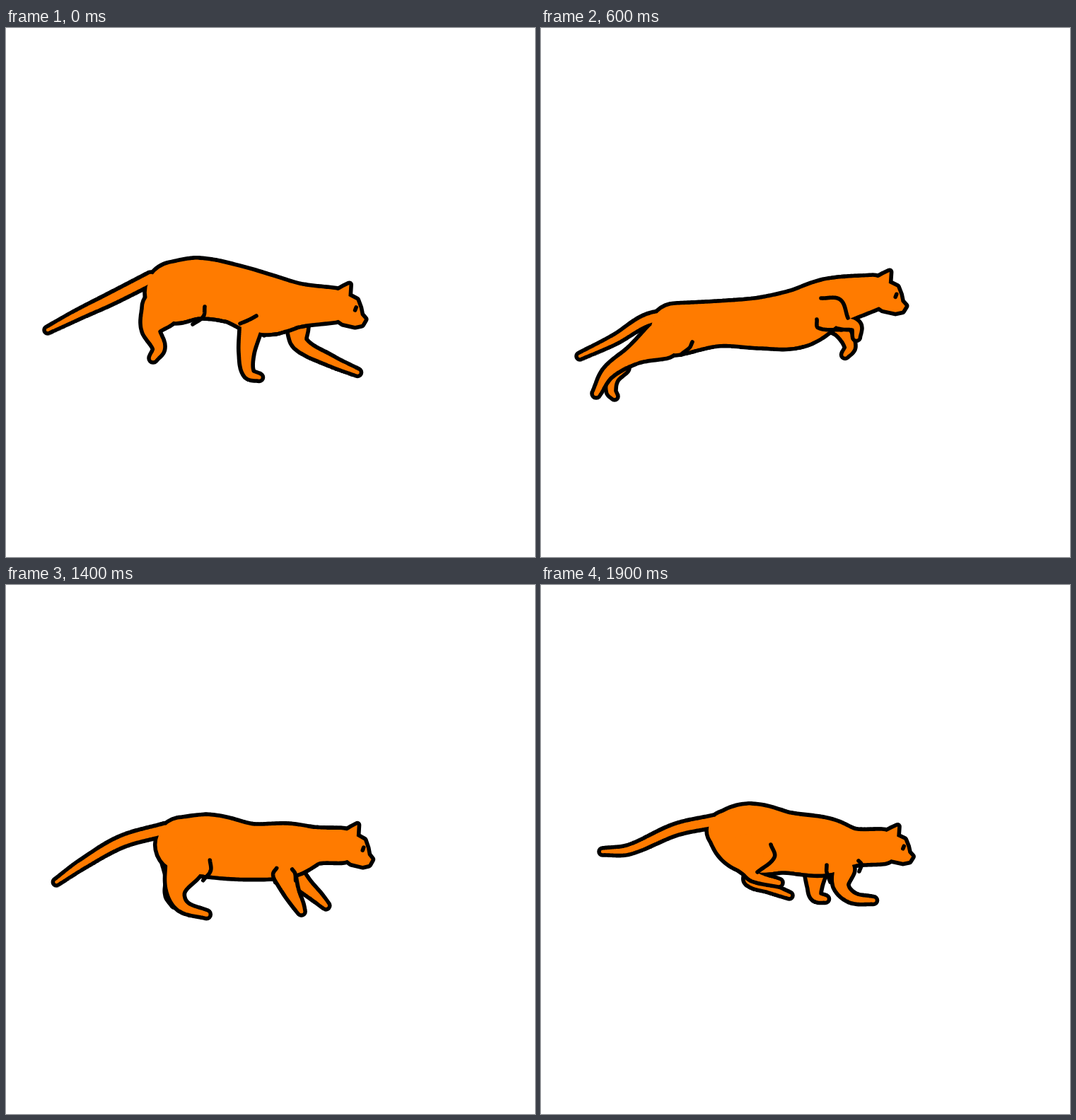
An HTML page with a canvas that plays this animation: 748 px wide and 748 px high, repeating every 2 s.

```html
<!DOCTYPE html>
<html lang="en">
<head>
<meta charset="utf-8">
<title>Running cat</title>
<style>
html, body { margin: 0; width: 100%; height: 100%; overflow: hidden; background: #fff; }
canvas { display: block; width: 748px; height: 748px; }
</style>
</head>
<body>
<canvas id="stage" width="748" height="748"></canvas>
<script>
const ctx = document.getElementById('stage').getContext('2d');
const STEP = 100, STEPS = 20;
const ORANGE = '#ff7b00', INK = '#000', LINE = 5.6;

// Thickness of each limb, root to tip.
const HIND = [28, 14, 9, 6], FORE = [16, 11, 8, 5.5], FAR_HIND = [10, 8, 7, 5], TAIL = [5, 7, 8.5, 9];

// Head profile from the back of the ear, in a 42 x 45 box that ends at the nose.
const HEAD = points('4,3 9,0 17,-4 16,12 27,18 31,29 33,39 38,45 34,52 25,54 8,50 -6,40 -6,8');

// Joints of the skeleton at the key moments. The torso is x,y,radius; the head is ear and nose.
const poses = [
  { at: 0,
    tail: '59,427 100,406 150,382 205,354',
    torso: '240,374,44 272,368,43 322,376,41 366,391,43 412,392,31',
    head: '468,367 511,412',
    hind: '220,396 205,424 216,452 208,467',
    fore: '346,424 340,460 343,488 358,494',
    farHind: '235,400 240,400 245,400 250,400',
    farFore: '412,422 416,446 458,470 497,487',
    hip: '281,394 279,408 264,419',
    shoulder: '331,418 345,412 354,407',
    chest: '365,435 365,435 365,435' },
  { at: 2,
    tail: '62,433 105,429 155,416 228,370',
    torso: '245,388,30 282,384,51 325,388,49 378,403,41 425,399,26',
    head: '470,371 508,414',
    hind: '282,415 281,452 315,476 341,490',
    fore: '368,430 365,465 374,498 392,504',
    farHind: '320,442 300,462 280,480 265,497',
    farFore: '378,420 380,424 384,424 388,424',
    hip: '320,406 324,418 318,441',
    shoulder: '351,427 352,433 354,440',
    chest: '403,417 397,435 386,445' },
  { at: 6,
    tail: '55,464 105,440 150,413 195,405',
    torso: '190,426,37 250,418,32 310,417,36 362,411,41 408,389,35',
    head: '475,349 519,393',
    hind: '172,440 133,461 95,487 78,517',
    fore: '402,403 425,415 445,421 446,437',
    farHind: '115,480 102,495 99,513 104,521',
    farFore: '408,412 425,427 437,450 430,462',
    hip: '214,444 210,452 200,460',
    shoulder: '390,412 392,424 425,427',
    chest: '396,382 423,384 434,410' },
  { at: 9,
    tail: '64,414 95,397 145,377 200,358',
    torso: '214,381,33 250,381,33 300,387,39 365,393,37 415,392,36',
    head: '478,350 522,397',
    hind: '195,404 152,414 128,438 121,463',
    fore: '428,420 452,437 490,444 527,456',
    farHind: '150,420 128,438 118,446 108,454',
    farFore: '430,415 460,437 490,449 506,461',
    hip: '244,407 240,414 230,422',
    shoulder: '400,409 405,425 413,437',
    chest: '444,381 454,393 458,404' },
  { at: 12,
    tail: '78,406 115,379 170,337 225,327',
    torso: '250,350,38 288,351,43 345,371,41 395,377,40 440,374,27',
    head: '478,346 523,390',
    hind: '250,372 238,408 244,421 270,441',
    fore: '440,406 466,430 505,450 553,461',
    farHind: '252,390 248,410 263,416 277,430',
    farFore: '360,408 356,442 361,476 381,480',
    hip: '285,375 286,388 272,401',
    shoulder: '404,407 413,417 430,426',
    chest: '442,384 458,391 463,410' },
  { at: 15,
    tail: '68,427 105,402 160,376 225,355',
    torso: '250,376,40 290,378,45 345,380,39 400,374,37 435,366,26',
    head: '482,342 519,387',
    hind: '255,405 241,440 252,470 290,478',
    fore: '370,410 372,436 367,453 350,462',
    farHind: '216,382 226,415 216,448 219,462',
    farFore: '425,405 455,416 480,424 488,440',
    hip: '290,396 291,412 282,426',
    shoulder: '372,397 360,404 356,418',
    chest: '386,411 384,416 383,422' },
  { at: 19,
    tail: '87,377 125,374 190,346 245,334',
    torso: '262,347,28 296,358,49 345,364,43 400,370,41 440,371,27',
    head: '488,345 528,384',
    hind: '290,378 294,398 302,411 336,421',
    fore: '428,402 424,425 440,442 470,446',
    farHind: '300,405 295,418 322,428 351,439',
    farFore: '388,405 387,425 389,440 402,444',
    hip: '325,367 330,385 306,406',
    shoulder: '404,396 404,406 409,420',
    chest: '449,390 453,395 450,405' }
];

function points(text) {
  return text.split(' ').map(p => p.split(',').map(Number));
}

const PARTS = Object.keys(poses[0]).filter(name => name !== 'at');
for (const pose of poses)
  for (const name of PARTS) pose[name] = points(pose[name]);

function poseAt(step) {
  const next = poses.findIndex(p => p.at >= step);
  const b = poses[next], a = poses[Math.max(next - 1, 0)];
  const t = a === b ? 0 : (step - a.at) / (b.at - a.at);
  const pose = {};
  for (const name of PARTS)
    pose[name] = a[name].map((p, i) => p.map((v, c) => v + (b[name][i][c] - v) * t));
  return pose;
}

// Hermite curve through the joints, tangents scaled to each span; also blends radii.
function smooth(pts) {
  const length = (a, b) => Math.hypot(b[0] - a[0], b[1] - a[1]);
  const dirs = pts.map((p, i) => {
    const a = pts[Math.max(i - 1, 0)], b = pts[Math.min(i + 1, pts.length - 1)];
    return p.map((_, c) => (b[c] - a[c]) / (length(a, b) || 1));
  });
  const out = [pts[0]];
  for (let i = 1; i < pts.length; i++) {
    const a = pts[i - 1], b = pts[i], len = length(a, b);
    for (let k = 1; k <= 24; k++) {
      const t = k / 24, s = t * t * (3 - 2 * t);
      const u = t * (1 - t) * (1 - t) * len, v = t * t * (t - 1) * len;
      out.push(a.map((_, c) => a[c] + (b[c] - a[c]) * s + dirs[i - 1][c] * u + dirs[i][c] * v));
    }
  }
  return out;
}

const limb = (joints, radii) => smooth(joints.map((p, i) => [...p, radii[i]]));

// A row of overlapping discs makes a tapered, round-ended shape.
function sweep(beads, grow) {
  ctx.beginPath();
  for (const [x, y, r] of beads) {
    const size = Math.max(r + grow, 0);
    ctx.moveTo(x + size, y);
    ctx.arc(x, y, size, 0, 2 * Math.PI);
  }
  ctx.fill();
}

function trace(pts) {
  ctx.beginPath();
  pts.forEach(p => ctx.lineTo(p[0], p[1]));
}

// Ink first, then colour on top, so that joined shapes share one outline.
function merge(shapes, face = []) {
  for (const [color, grow] of [[INK, LINE / 2], [ORANGE, -LINE / 2]]) {
    ctx.fillStyle = color;
    shapes.forEach(s => sweep(s, grow));
    trace(face);
    ctx.closePath();
    ctx.fill();
    if (color === INK) {
      ctx.lineWidth = LINE * 2;
      ctx.stroke();
    }
  }
}

function draw(pose) {
  ctx.fillStyle = '#fff';
  ctx.fillRect(0, 0, 748, 748);
  ctx.strokeStyle = INK;
  ctx.lineCap = ctx.lineJoin = 'round';

  const [ear, nose] = pose.head;
  const place = ([x, y]) => [ear[0] + x * (nose[0] - ear[0]) / 42, ear[1] + y * (nose[1] - ear[1]) / 45];
  const neck = [ear[0] - 6, ear[1] + 25, 25];

  merge([limb(pose.farHind, FAR_HIND)]);
  merge([limb(pose.farFore, FORE)]);
  merge([
    limb(pose.tail, TAIL),
    smooth([...pose.torso, neck]),
    limb(pose.hind, HIND),
    limb(pose.fore, FORE)
  ], HEAD.map(place));

  ctx.lineWidth = LINE;
  for (const line of [pose.hip, pose.shoulder, pose.chest, [[26.5, 28], [25, 32]].map(place)]) {
    trace(smooth(line));
    ctx.stroke();
  }
}

const start = performance.now();
let shown = -1;
function tick() {
  const step = Math.floor((performance.now() - start) / STEP) % STEPS;
  if (step !== shown) draw(poseAt(shown = step));
  requestAnimationFrame(tick);
}
tick();
</script>
</body>
</html>
```
